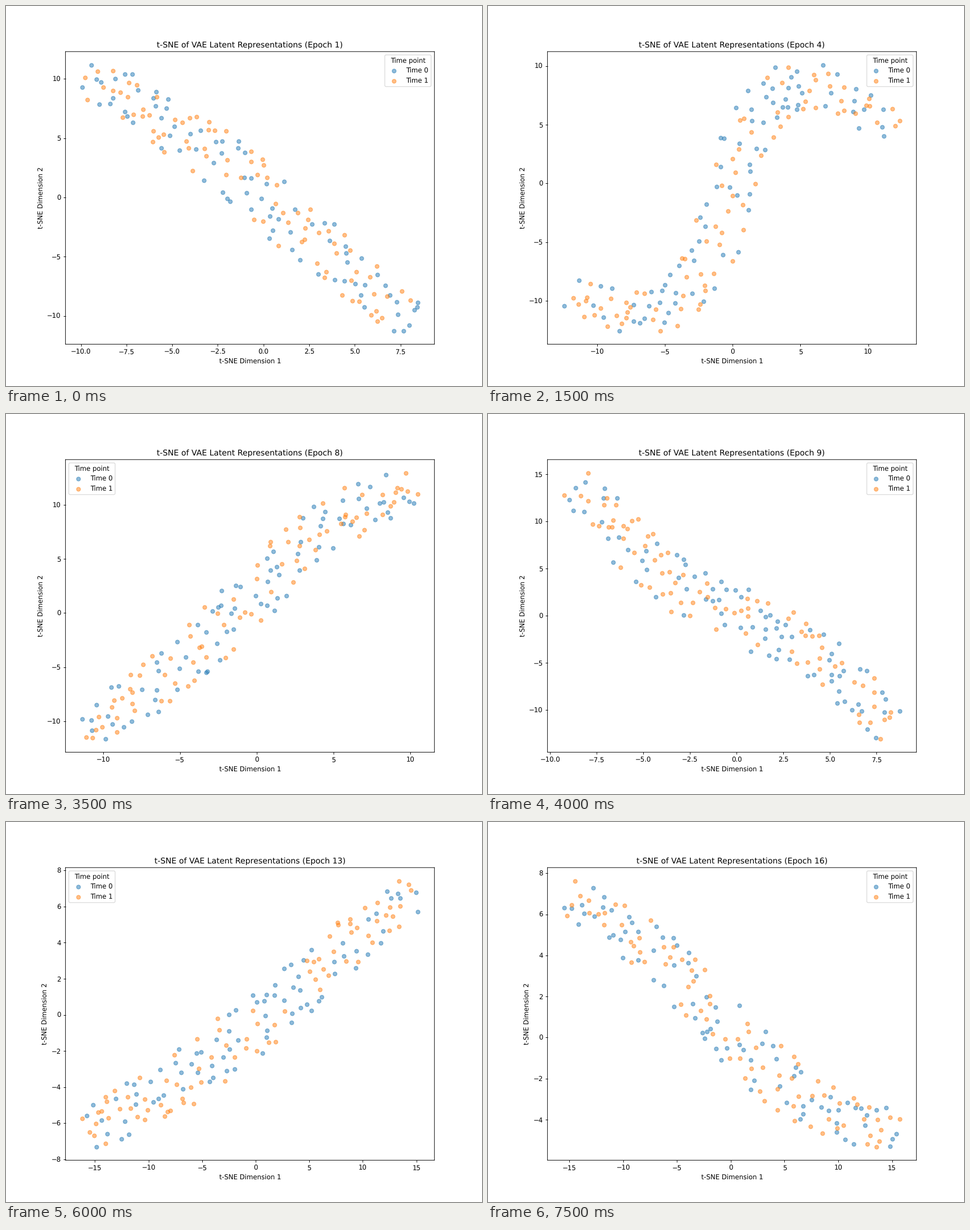
Animation of 837 by 669 pixels, one loop 8000 ms. Source, as a matplotlib script:

```python
import numpy as np
import matplotlib.pyplot as plt
from matplotlib.animation import FuncAnimation

W, H, DPI = 837, 669, 83.7
EPOCHS = 16
PER_CLASS = 80
ASPECT = 1.26       # width to height of the area the points fill
HALF_WIDTH = 0.1    # of the point band, relative to that height
FALLING = {1, 2, 9, 10, 14, 16}

# Key epochs: bow, sway, x min, x max, y min, y max; the rest is interpolated.
KEYS = {
    1: (-0.06, -0.02, -9.92, 8.44, -11.27, 11.19),
    4: (0.12, -0.39, -12.43, 12.32, -12.56, 10.09),
    6: (0.06, -0.24, -15.57, 13.89, -8.84, 8.59),
    9: (0.03, 0.06, -9.24, 8.75, -13.04, 15.14),
    11: (0.09, -0.06, -14.62, 14.60, -10.79, 10.47),
    14: (-0.16, 0.0, -16.97, 15.37, -5.57, 5.90),
    16: (0.09, -0.06, -15.47, 15.70, -5.33, 7.63),
}

# Unhinted text and unsnapped lines keep sub-pixel positions.
plt.rcParams.update({"text.hinting": "none", "path.snap": False})


def center_line(bow, sway):
    """Sampled rising curve: a diagonal bent by a half and a full sine wave."""
    u = np.linspace(0, 1, 801)
    wave = np.sin(2 * np.pi * u)
    x = u - 0.19 * sway * wave
    y = u + bow * np.sin(np.pi * u) + sway * wave
    y = 0.08 + 0.84 * (y - y.min()) / np.ptp(y)
    return u, np.column_stack([ASPECT * x, y])


def spread(bow, sway, rng):
    """Fill a band around the curve, keeping points a little apart."""
    u, line = center_line(bow, sway)
    slope = np.gradient(line, axis=0)
    normal = np.column_stack([-slope[:, 1], slope[:, 0]])
    normal /= np.linalg.norm(normal, axis=1, keepdims=True)
    taper = 0.55 + 0.45 * np.sin(np.pi * u) ** 0.4
    band = normal * HALF_WIDTH * taper[:, None]

    pts = np.empty((0, 2))
    for i in range(2 * PER_CLASS):
        # Two candidates; the one farther from its neighbours stays.
        at = (i + rng.uniform(-2, 3, 2)) / (2 * PER_CLASS)
        j = (np.clip(at, 0, 1) * (len(u) - 1)).astype(int)
        options = line[j] + band[j] * rng.uniform(-1, 1, (2, 1))
        gaps = [np.linalg.norm(pts - p, axis=1).min(initial=9) for p in options]
        pts = np.vstack([pts, options[np.argmax(gaps)]])
    return rng.permutation(pts)


def latent_points(epoch):
    rows = np.array(list(KEYS.values())).T
    bow, sway, x0, x1, y0, y1 = (np.interp(epoch, list(KEYS), r) for r in rows)
    pts = spread(bow, sway, np.random.default_rng(epoch))
    t = (pts - pts.min(axis=0)) / np.ptp(pts, axis=0)
    if epoch in FALLING:
        t[:, 1] = 1 - t[:, 1]
    return t * (x1 - x0, y1 - y0) + (x0, y0)


data = [latent_points(e) for e in range(1, EPOCHS + 1)]

fig, ax = plt.subplots(figsize=((W + 0.01) / DPI, (H + 0.01) / DPI), dpi=DPI)


def draw(index):
    ax.clear()
    for k in range(2):
        x, y = data[index][k::2].T
        ax.scatter(x, y, alpha=0.5, color=f"C{k}", label=f"Time {k}")
    ax.set_title(f"t-SNE of VAE Latent Representations (Epoch {index + 1})")
    ax.set_xlabel("t-SNE Dimension 1")
    ax.set_ylabel("t-SNE Dimension 2")
    ax.legend(title="Time point", loc="best")
    return []


anim = FuncAnimation(fig, draw, frames=EPOCHS, interval=500,
                     repeat=True, repeat_delay=0)
plt.show()
```
